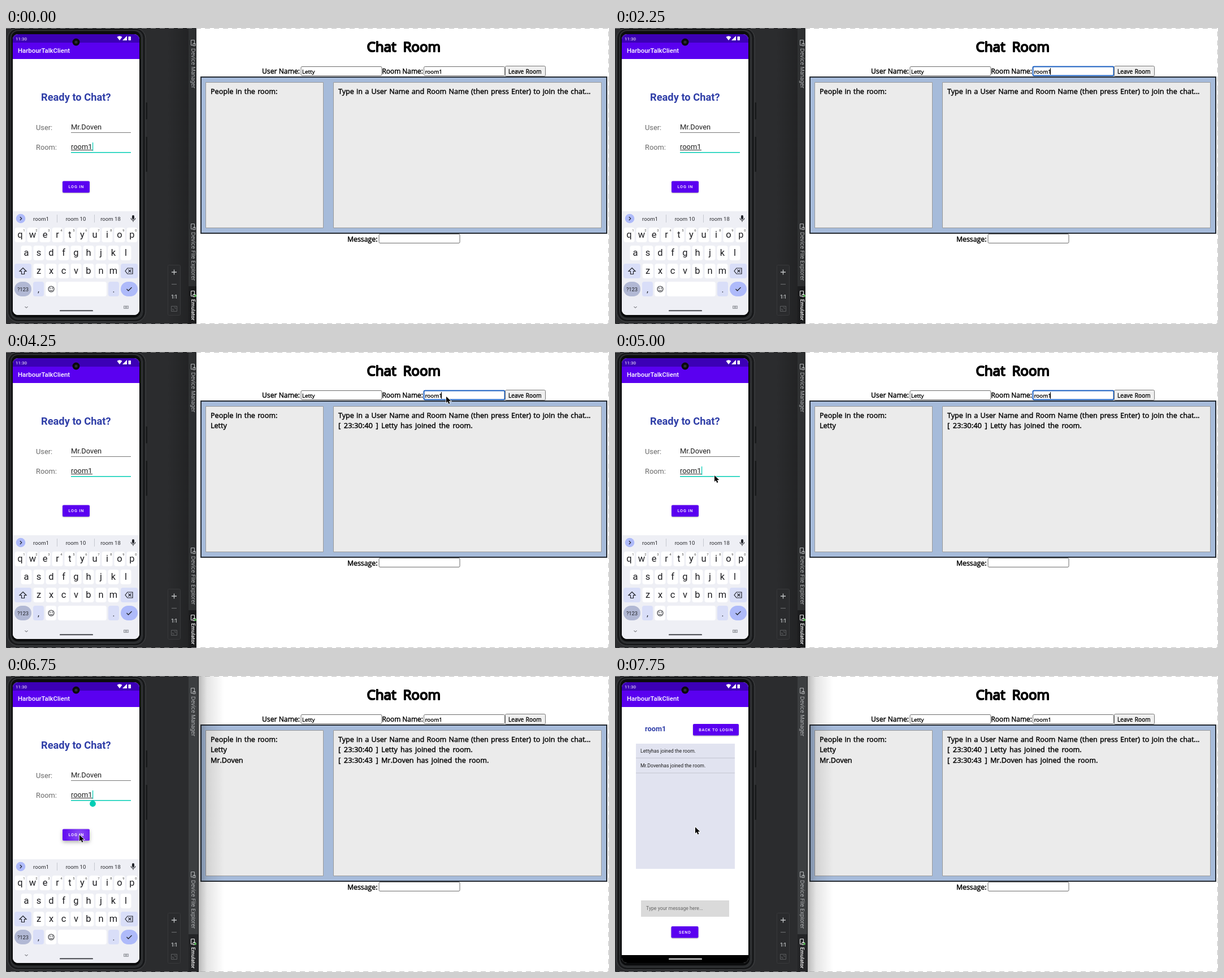
Animation, 1067 px wide and 525 px high, one loop 8 s. Source, as an HTML page with a canvas:

```html
<!DOCTYPE html>
<html lang="en">
<head>
<meta charset="utf-8">
<title>Chat room demo</title>
<style>
html, body { margin: 0; width: 100%; height: 100%; overflow: hidden; background: #fff; }
canvas { display: block; width: 100%; height: 100%; }
</style>
</head>
<body>
<canvas id="stage" width="1067" height="525"></canvas>
<script>
const ctx = document.getElementById('stage').getContext('2d');
const W = 1067, H = 525, LOOP = 8000, STEP = 250;
const APP = 'HarbourTalkClient', GUEST = 'Mr.Doven', HOST = 'Letty', ROOM = 'room1';
const PURPLE = '#5a00f0', INDIGO = '#303fa8', TEAL = '#00cdb4';

// When each event happens, in ms.
const AT = { focus: 1500, hide: 2250, hostJoin: 3000, tap: 5250, guestJoin: 6750, chat: 7000 };

// Pointer stops: time, x, y. Each run is one visible stretch.
const RUNS = [
  { end: AT.hide, stops: [[500, 640, 505], [750, 700, 290], [1000, 765, 120], [1250, 782, 79]] },
  { end: LOOP, stops: [[4250, 779, 79], [4500, 450, 160], [4750, 131, 232], [5000, 176, 219],
    [5250, 160, 218], [5500, 150, 245], [5750, 139, 272], [6250, 130, 282], [7000, 130, 282], [7750, 142, 268]] }
];

const roboto = (size, weight = 400) => `${weight} ${size}px Roboto, sans-serif`;
const hand = size => `${size}px "Open Sans", sans-serif`;
const inter = (size, weight = 400) => `${weight} ${size}px Inter, sans-serif`;

function box(x, y, w, h, fill, r = 0, stroke, width = 1) {
  ctx.beginPath();
  ctx.roundRect(x, y, w, h, r);
  if (fill) { ctx.fillStyle = fill; ctx.fill(); }
  if (stroke) { ctx.strokeStyle = stroke; ctx.lineWidth = width; ctx.stroke(); }
}

function disc(x, y, r, fill) {
  ctx.beginPath();
  ctx.arc(x, y, r, 0, 7);
  ctx.fillStyle = fill;
  ctx.fill();
}

function path(color, width, d, fill) {
  const p = new Path2D(d);
  if (fill) { ctx.fillStyle = fill; ctx.fill(p); }
  if (color) { ctx.strokeStyle = color; ctx.lineWidth = width; ctx.stroke(p); }
}

function text(s, x, y, font, color, { align = 'left', track = 0, word = 0 } = {}) {
  ctx.font = font;
  ctx.fillStyle = color;
  ctx.textAlign = align;
  ctx.letterSpacing = track + 'px';
  ctx.wordSpacing = word + 'px';
  ctx.fillText(s, x, y);
}

// Page lettering: a round outline gives it the look of a marker pen.
function marker(s, x, y, size, word = 0, weight = 0.45) {
  text(s, x, y, hand(size), '#000', { word });
  ctx.lineJoin = 'round';
  ctx.strokeStyle = '#000';
  ctx.lineWidth = weight;
  ctx.strokeText(s, x, y);
  ctx.lineJoin = 'miter';
}

const mid = { align: 'center' };

function fade(x0, x1, from, to) {
  const g = ctx.createLinearGradient(x0, 0, x1, 0);
  g.addColorStop(0, from);
  g.addColorStop(1, to);
  ctx.fillStyle = g;
  ctx.fillRect(x0, 0, x1 - x0, H);
}

function sideTab(label, y, font, color) {
  path(color, 1, `M327.5 ${y - 14.5}h6v8M327.5 ${y - 14.5}v9h3M331 ${y - 8.5}h4v4h-4z`);
  ctx.save();
  ctx.translate(328, y);
  ctx.rotate(Math.PI / 2);
  text(label, 0, 0, font, color);
  ctx.restore();
}

function sidePanel(front) {
  const edge = front ? 341 : 337;
  box(0, 0, edge, H, '#2b2c2e');
  box(323, 0, edge - 323, H, '#3c3e40');
  box(323, 458, edge - 323, 67, '#242527');
  if (!front) fade(285, 337, 'rgba(0,0,0,0)', 'rgba(0,0,0,.28)');
  else box(340, 0, 1, H, '#1e1f20');
  sideTab('Device Manager', 36, inter(9.2), '#b4b6b8');
  sideTab('Device File Explorer', 362, inter(9.2), '#b4b6b8');
  sideTab('Emulator', 481, inter(8.8, 600), '#f2f2f2');
  disc(335, 475, 2, '#4fb04f');

  box(286.5, 420.5, 22, 89, '#2a2b2d', 2, '#38393b');
  path('#c4c6c8', 1.3, 'M293 433h9M297.5 428.5v9');
  path('#66686a', 1.2, 'M293 454.5h9');
  text('1:1', 297.5, 479.5, inter(8.5, 600), '#c4c6c8', mid);
  path('#5c5e60', 1, 'M292.5 493.5h10v9h-10zM295 500v-2.5M295 500h2.5M300 496v2.5M300 496h-2.5');
}

function phoneBody() {
  box(246, 132, 4, 30, '#151617', 1);
  box(246, 193, 4, 62, '#151617', 1);
  box(3, 0.5, 244, 520.5, '#1c1d1f', 18, '#47494b');
  box(6.5, 2.5, 237, 516, '#2c2e30', 15, '#0b0c0d');
  box(9.5, 5.5, 229, 508, '#0b0c0d', 12);
  ctx.save();
  ctx.beginPath();
  ctx.roundRect(12, 11, 224, 498, 9);
  ctx.clip();
}

function appBar() {
  box(12, 11, 224, 498, '#fff');
  box(12, 11, 224, 15, '#3c00b6');
  box(12, 26, 224, 29, PURPLE);
  text('11:30', 17, 21.5, roboto(8), '#fff');
  path(null, 0, 'M196.5 16q4.5-3.5 9 0l-4.5 6zM214 14v8h-8z', '#fff');
  box(216.5, 15, 4.5, 7, '#fff', 1);
  text(APP, 21, 44, roboto(11.4, 500), '#fff');
}

function button(x, y, w, label, { track = 0.9, lift = 1, glow } = {}) {
  ctx.shadowColor = 'rgba(0,0,0,.3)';
  ctx.shadowBlur = lift * 2;
  ctx.shadowOffsetY = lift;
  box(x, y, w, 20.5, PURPLE, 2);
  ctx.shadowColor = 'transparent';
  ctx.shadowOffsetY = 0;
  if (glow) box(x, y, w, 20.5, glow, 2);
  text(label, x + w / 2 + track / 2, y + 12.7, roboto(7.2, 500), '#fff', { align: 'center', track });
}

function pressGlow() {
  const g = ctx.createRadialGradient(130, 282, 2, 130, 282, 26);
  g.addColorStop(0, 'rgba(255,255,255,.3)');
  g.addColorStop(1, 'rgba(255,255,255,.06)');
  return g;
}

function key(x, y, w, fill = '#fff', r = 4) {
  box(x, y - 13, w, 26, fill, r);
}

function keyRow(chars, x, y, hints) {
  [...chars].forEach((c, i) => {
    const cx = x + i * 22;
    key(cx - 9.5, y, 19);
    text(c, cx, y + 5, roboto(16.5), '#1c1c20', mid);
    if (hints) text((i + 1) % 10, cx + 7, y - 6, roboto(5.8), '#444', mid);
  });
}

function keyboard() {
  const soft = '#d9def8', ink = '#202228';
  box(12, 325, 224, 184, '#eeeff5');
  disc(26, 338, 8.3, '#aebafa');
  path(ink, 1.1, 'M24.8 335l3 3-3 3');
  [ROOM, 'room 10', 'room 18'].forEach((s, i) =>
    text(s, 62 + i * 61.5, 341.5, roboto(9.6), '#2b2c30', mid));
  path('#c6c8d0', 1, 'M90.5 331v14M156.5 331v14');
  box(223, 332, 4, 7.5, ink, 2);
  path(ink, 1, 'M221 337q0 4 4 4t4-4M225 341v3');

  keyRow('qwertyuiop', 25, 367, true);
  keyRow('asdfghjkl', 36, 399);
  keyRow('zxcvbnm', 58, 431);

  key(15, 431, 30, soft);
  path(ink, 1.2, 'M30 425.5l6 6h-3.5v5h-5v-5h-3.5z');
  key(203, 431, 30, soft);
  path(ink, 1.2, 'M211 431l4-5h9v10h-9zM216.5 428.5l5 5M221.5 428.5l-5 5');

  key(15, 463, 30, '#b1b8d4', 13);
  text('?123', 30, 466.5, roboto(9.3), ink, mid);
  key(48, 463, 19, soft);
  text(',', 57.5, 469, roboto(15), ink, mid);
  key(70, 463, 19);
  path(ink, 1.1, 'M75 463a5 5 0 0 1 10 0a5 5 0 0 1-10 0M77.5 464.5q2.5 3 5 0');
  disc(78.2, 461.5, 0.9, ink);
  disc(81.8, 461.5, 0.9, ink);
  key(92, 463, 86);
  key(181, 463, 19, soft);
  text('.', 190.5, 469, roboto(15), ink, mid);
  key(203, 463, 30, '#aebafa', 13);
  path(ink, 1.3, 'M213.5 463l3 3 6-6');

  path('#44464c', 1, 'M33.5 494l2.5 2.5 2.5-2.5');
  path('#777a82', 0.8, 'M208.5 493h8v4.5h-8zM210 494.5h5M210 496h5');
  box(95, 500.5, 59, 1.8, '#303238', 1);
}

function loginScreen(t) {
  text('Ready to Chat?', 62, 129, roboto(18.3, 700), INDIGO);
  text('User:', 53, 180.5, roboto(12.8), '#6a6a6a');
  text('Room:', 53, 215.5, roboto(12.8), '#6a6a6a');
  text(GUEST, 115, 180, roboto(12.9), '#1e1e1e');
  text(ROOM, 115, 215, roboto(12.9), '#1e1e1e');
  box(115, 185, 106, 1, '#777');
  box(115, 216, 38, 1, '#333');
  box(115, 220, 106, 1.5, TEAL);
  if ((t + 250) % 1000 < 500) box(153, 203, 1.2, 15, TEAL);
  if (t >= AT.tap) {
    disc(153.5, 226.5, 5.4, TEAL);
    path(null, 0, 'M153.5 219.5l4.5 4.5h-9z', TEAL);
  }
  button(100, 271.5, 48, 'LOG IN', t >= AT.guestJoin ? { lift: 3, glow: pressGlow() } : {});
  keyboard();
}

function chatScreen() {
  text(ROOM, 53, 98, roboto(12.8, 700), INDIGO);
  button(138, 85, 81, 'BACK TO LOGIN', { track: 0.7 });
  box(37, 120, 175, 222, '#e1e3f0');
  [HOST, GUEST].forEach((name, i) => {
    text(name + 'has joined the room.', 45, 135.5 + i * 26.5, roboto(8.7), '#1e1e1e');
    box(37, 145 + i * 26.5, 175, 1, '#c3c5d2');
  });
  box(46, 398, 156, 29, '#dadada');
  text('Type your message here...', 55, 415, roboto(8.7), '#666');
  button(99.5, 444, 48, 'SEND');
  box(12, 495, 224, 14, '#000');
  box(95, 501, 59, 1.8, '#fff', 1);
}

function phone(t) {
  phoneBody();
  appBar();
  if (t < AT.chat) loginScreen(t);
  else chatScreen();
  ctx.restore();
  disc(124, 25, 6.5, '#0a0b0c');
  disc(124, 25, 2.6, '#2b2f33');
}

function field(x, y, value, active) {
  box(x + 0.5, y + 0.5, 143, 16, '#fff', 2, active ? '#1a5fc0' : '#6c6c6c', active ? 2 : 1);
  marker(value, x + 2.5, y + 13, 9.8, 0, 0.35);
}

function joined(name, time, y) {
  marker(name, 362, y, 12.6);
  marker(`[ ${time} ]`, 588, y, 12.9, 2.2);
  marker(`${name} has joined the room.`, 664, y, 12.6, 2);
}

function webPage(t) {
  const active = t >= AT.focus && t < AT.tap;
  marker('Chat Room', 638.5, 42, 24.2, 5.5, 1.9);
  marker('User Name:', 453, 81, 12.2);
  marker('Room Name:', 665.5, 81, 11.9);
  marker('Message:', 604, 378.5, 12.3);
  field(521.5, 68, HOST);
  field(739, 68, ROOM, active);
  if (active && t % 1000 < 500) box(770, 71, 1, 12, '#000');
  field(659.5, 365, '');
  box(883.5, 67.5, 71, 18, '#efefef', 2, '#777');
  marker('Leave Room', 889, 80.5, 10.1, 1, 0.35);

  box(345, 87, 718, 277, '#a6bbda', 0, '#252b33', 2);
  box(353.5, 96.5, 208, 258, '#ebebeb', 0, '#9a9a9a');
  box(579.5, 96.5, 474, 258, '#ebebeb', 0, '#9a9a9a');
  marker('People in the room:', 362, 117, 12.6, 1);
  marker('Type in a User Name and Room Name (then press Enter) to join the chat...', 588, 117, 12.6, 1);
  if (t >= AT.hostJoin) joined(HOST, '23:30:40', 135);
  if (t >= AT.guestJoin) joined(GUEST, '23:30:43', 154);
}

function pointer(t) {
  const run = RUNS.find(r => t >= r.stops[0][0] && t < r.end);
  if (!run) return;
  const next = run.stops.findIndex(s => s[0] > t);
  const b = run.stops.at(next), a = next < 1 ? b : run.stops[next - 1];
  const k = a === b ? 0 : (t - a[0]) / (b[0] - a[0]);
  const arrow = 'M0 0V12L2.8 9.5L4.8 14L7 13L5 8.7H9Z';
  ctx.save();
  ctx.translate(a[1] + (b[1] - a[1]) * k, a[2] + (b[2] - a[2]) * k);
  ctx.scale(0.92, 0.92);
  path('#fff', 1.6, arrow);
  path(null, 0, arrow, '#000');
  ctx.restore();
}

function dashedFrame() {
  ctx.setLineDash([9, 7]);
  path('rgba(165,165,165,.7)', 1, `M0 .5H${W - 0.5}V${H - 0.5}H0`);
  ctx.setLineDash([]);
}

function draw(t) {
  const front = t >= AT.tap;
  box(0, 0, W, H, '#fff');
  webPage(t);
  if (front) {
    fade(341, 356, 'rgba(0,0,0,.27)', 'rgba(0,0,0,.1)');
    fade(356, 386, 'rgba(0,0,0,.1)', 'rgba(0,0,0,0)');
  }
  sidePanel(front);
  phone(t);
  dashedFrame();
  pointer(t);
}

const start = performance.now();
function tick() {
  const t = (performance.now() - start) % LOOP;
  draw(Math.floor(t / STEP) * STEP);
  requestAnimationFrame(tick);
}
tick();
</script>
</body>
</html>
```
